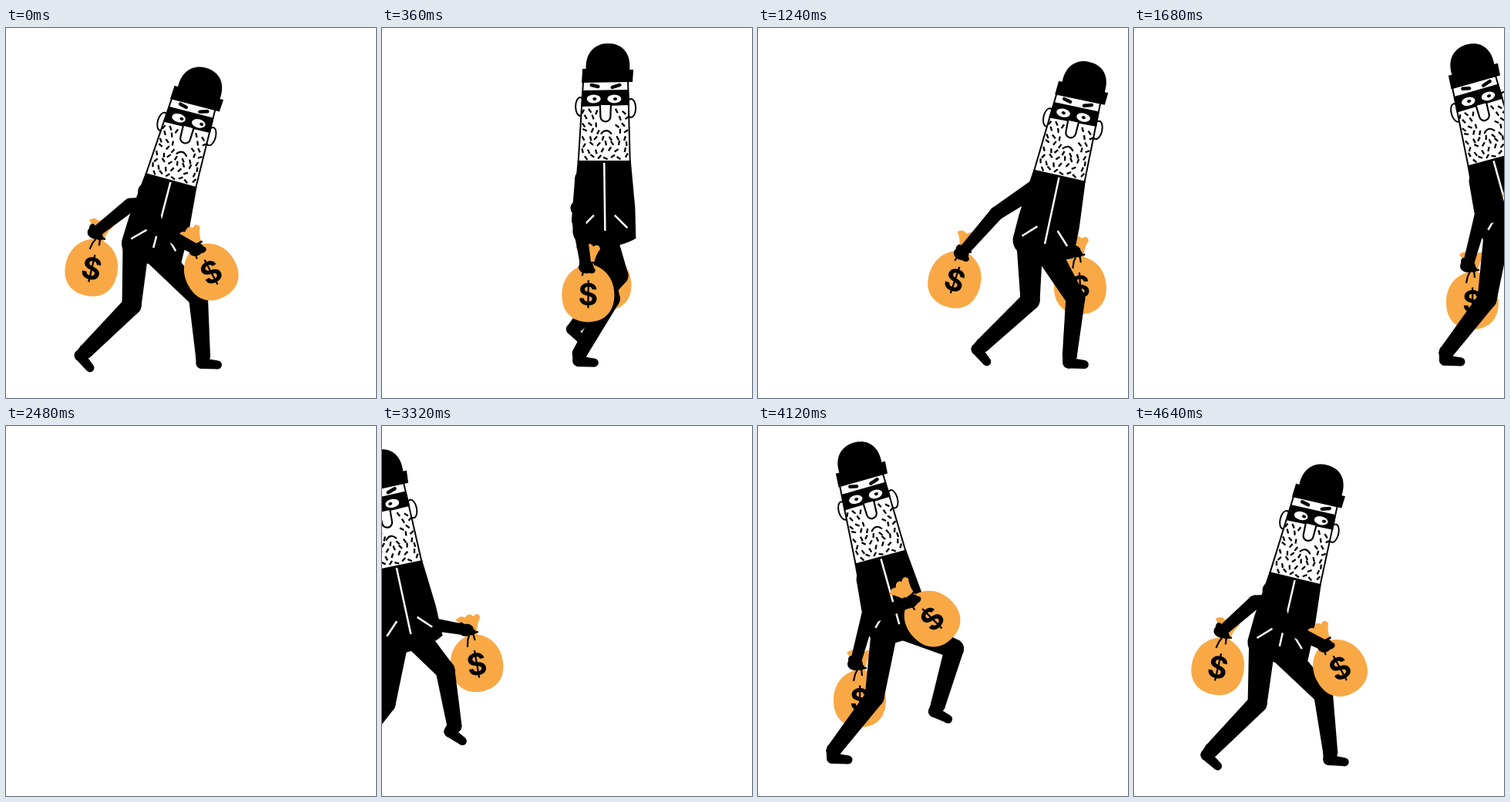
Write an HTML page with a canvas that moves like this. It is 480 by 480 pixels and loops after 4680 ms.

```html
<!DOCTYPE html>
<html lang="en">
<head>
<meta charset="utf-8">
<title>Sneaking burglar</title>
<style>
html, body { margin: 0; width: 100%; height: 100%; overflow: hidden; background: #fff; }
canvas { display: block; width: 480px; height: 480px; }
</style>
</head>
<body>
<canvas id="stage" width="480" height="480"></canvas>
<script>
const ctx = document.getElementById('stage').getContext('2d');
const LOOP = 4680, CYCLE = 2240, TICK = 40, STRIDE = 307;
const BLACK = '#000', WHITE = '#fff', GOLD = '#f9a846';

// Smooth keyed track that repeats every `period`, moving on by `stride` in its first column
// (and in every column listed in `moving`). Rows are [phase, ...values].
function track(rows, period, stride, moving = [0]) {
  const n = rows.length;
  const key = i => {
    const turn = Math.floor(i / n), row = rows[i - turn * n];
    return { p: row[0] + turn * period, v: row.slice(1).map((x, c) => moving.includes(c) ? x + turn * stride : x) };
  };
  const slope = (a, b, c) => (b.v[c] - a.v[c]) / (b.p - a.p);
  const tangent = (s, t) => s * t <= 0 ? 0 : 2 * s * t / (s + t);
  return phase => {
    let i = Math.floor(phase / period) * n;
    while (key(i + 1).p <= phase) i++;
    const [k0, k1, k2, k3] = [-1, 0, 1, 2].map(d => key(i + d));
    const h = k2.p - k1.p, u = (phase - k1.p) / h;
    return k1.v.map((a, c) => {
      const s = slope(k1, k2, c);
      const m1 = tangent(slope(k0, k1, c), s) * h, m2 = tangent(s, slope(k2, k3, c)) * h;
      const d = k2.v[c] - a;
      return a + u * (m1 + u * (3 * d - 2 * m1 - m2 + u * (m1 + m2 - 2 * d)));
    });
  };
}

// chin x, y, lean
const body = track([
  [0, 159, 170.5, -15], [.107, 157, 178, -15.5], [.143, 162, 182, -11.5],
  [.232, 209, 198, 13.6], [.25, 214, 198, 15.3], [.41, 288, 173, 0]
], .5, STRIDE / 2);

// knee x, y, ankle x, y, foot angle
const leg = track([
  [0, 151, 352, 98, 421, 0], [.107, 141, 360, 98, 424, 0], [.232, 160, 360, 101, 420, 38],
  [.25, 163, 360, 104, 419, 45], [.375, 262, 335, 200, 395, 45], [.5, 403, 289, 382, 362, 22],
  [.607, 381, 299, 386, 376, 25], [.643, 379, 317, 391, 389, 30], [.75, 398, 350, 404, 425, 0]
], 1, STRIDE, [0, 2]);

// bag centre x, y, tilt
const nearBag = track([
  [0, 226, 250, -45], [.16, 268, 304, -34], [.19, 272, 309, -30], [.25, 266, 317, -28],
  [.375, 268, 345, -5], [.5, 262, 346, 15], [.607, 222, 325, 42], [.67, 204, 316, 44],
  [.75, 213, 312, 30], [.87, 345, 348, 2]
], 1, STRIDE);
const farBag = track([
  [0, 132, 355, 0], [.13, 103, 335, 10], [.25, 111, 312, 13], [.375, 240, 345, 0],
  [.5, 397, 275, -25], [.607, 419, 290, -15], [.643, 420, 309, -10], [.75, 417, 325, -5], [.88, 421, 348, -2]
], 1, STRIDE);

// face shift, pupil shift
const look = track([[0, 0, 1], [.25, 0, 4], [.5, -3, -1], [.607, -4, -3], [.75, -2, 0]], 1, 0, []);
// hip position of one leg, sideways in the jacket
const hip = track([[0, -21], [.25, -21], [.5, 7], [.75, 7]], 1, 0, []);

const rad = deg => deg * Math.PI / 180;
const place = ([x, y, deg], lx, ly) => {
  const c = Math.cos(rad(deg)), s = Math.sin(rad(deg));
  return [x + lx * c - ly * s, y + lx * s + ly * c];
};
function inFrame([x, y, deg], draw) {
  ctx.save();
  ctx.translate(x, y);
  ctx.rotate(rad(deg));
  draw();
  ctx.restore();
}
function fill(color, build) {
  ctx.beginPath();
  build();
  ctx.closePath();
  ctx.fillStyle = color;
  ctx.fill();
}
const poly = (color, ...pts) => fill(color, () => pts.forEach(p => ctx.lineTo(...p)));
const oval = (color, x, y, rx, ry = rx) => fill(color, () => ctx.ellipse(x, y, rx, ry, 0, 0, 7));
function line(color, width, ...pts) {
  ctx.beginPath();
  pts.forEach(p => ctx.lineTo(...p));
  ctx.strokeStyle = color;
  ctx.lineWidth = width;
  ctx.stroke();
}
function taper(a, b, ra, rb) {
  const d = Math.hypot(b[0] - a[0], b[1] - a[1]) || 1;
  const nx = (a[1] - b[1]) / d, ny = (b[0] - a[0]) / d;
  oval(BLACK, ...a, ra);
  oval(BLACK, ...b, rb);
  poly(BLACK, [a[0] + nx * ra, a[1] + ny * ra], [b[0] + nx * rb, b[1] + ny * rb],
    [b[0] - nx * rb, b[1] - ny * rb], [a[0] - nx * ra, a[1] - ny * ra]);
}

function drawLeg(hipPoint, [kx, ky, ax, ay, turn], shift) {
  const knee = [kx + shift, ky], ankle = [ax + shift, ay], foot = [...ankle, turn];
  taper(hipPoint, knee, 17, 12.5);
  taper(knee, ankle, 12.5, 9.5);
  taper(place(foot, -2, 10), place(foot, 19, 12), 7, 5.5);
  taper(ankle, place(foot, -1, 9), 9.5, 8);
}

function drawArm(shoulder, hand, tilt) {
  const dx = hand[0] - shoulder[0], dy = hand[1] - shoulder[1], d = Math.hypot(dx, dy);
  const k = Math.max(1, d / 107), upper = 50 * k, lower = 58 * k;
  const along = (upper * upper - lower * lower + d * d) / (2 * d);
  const out = Math.sqrt(Math.max(0, upper * upper - along * along));
  const elbow = [shoulder[0] + (dx * along - dy * out) / d, shoulder[1] + (dy * along + dx * out) / d];
  taper(shoulder, elbow, 11, 9);
  taper(elbow, hand, 9, 7);
  inFrame([...hand, tilt], () => {
    oval(BLACK, 0, 0, 10, 8);
    oval(BLACK, -5, -6, 4, 5);
    oval(BLACK, 7, 4, 5, 4);
  });
}

function drawBag(pose) {
  inFrame(pose, () => {
    fill(GOLD, () => {
      ctx.moveTo(-7, -38);
      ctx.quadraticCurveTo(-9, -52, -17, -61);
      ctx.quadraticCurveTo(-10, -67, -5, -62);
      ctx.quadraticCurveTo(2, -69, 6, -62);
      ctx.quadraticCurveTo(13, -67, 15, -59);
      ctx.quadraticCurveTo(8, -50, 7, -38);
      ctx.bezierCurveTo(25, -32, 34, -17, 34, 1);
      ctx.bezierCurveTo(34, 24, 20, 36, 0, 36);
      ctx.bezierCurveTo(-20, 36, -34, 24, -34, 1);
      ctx.bezierCurveTo(-34, -17, -25, -32, -7, -38);
    });
    line(BLACK, 2.5, [-9, -41], [9, -41]);
    line(BLACK, 2.2, [-2, -41], [-6, -33], [-8, -24]);
    line(BLACK, 2.2, [2, -41], [3, -31]);
    ctx.fillStyle = BLACK;
    ctx.font = 'bold 39px Inter, Arial, sans-serif';
    ctx.textAlign = 'center';
    ctx.textBaseline = 'alphabetic';
    ctx.fillText('$', 0, 14);
  });
}

function drawJacket() {
  fill(BLACK, () => {
    ctx.moveTo(-34.5, -1);
    ctx.lineTo(34.5, -1);
    ctx.lineTo(40, 60);
    ctx.lineTo(41, 100);
    ctx.quadraticCurveTo(20, 112, -10, 112);
    ctx.quadraticCurveTo(-38, 112, -41, 92);
    ctx.lineTo(-40, 60);
  });
  line(WHITE, 2.5, [0, 2], [1, 90]);
  for (const side of [-1, 1]) line(WHITE, 2.5, [13.5 * side, 70], [30 * side, 86.5]);
}

const noise = n => { const v = Math.sin(n * 127.1 + 11.7) * 43758.5453; return v - Math.floor(v); };
function drawStubble() {
  for (let row = 0; row < 8; row++) for (let col = 0; col < 7; col++) {
    const id = row * 7 + col;
    const x = -27 + col * 9 + (row % 2 ? 2 : -1) + (noise(id) - .5) * 3;
    const y = -64 + row * 8.3 + (noise(id + 60) - .5) * 4;
    const byNose = Math.abs(x - 2) < 11 && y < -46;
    const byMouth = Math.abs(x - 3) < 10 && y > -45 && y < -32;
    if (byNose || byMouth || x > 30) continue;
    const a = (noise(id + 120) - .5) * 2.4 + Math.PI / 2, c = Math.cos(a) * 3, s = Math.sin(a) * 3;
    line(BLACK, 2.3, [x - c, y - s], [x + c, y + s]);
  }
}

function drawHead([shift, pupil]) {
  for (const [x, y] of [[-31, -71], [35, -69]]) {
    oval(BLACK, x, y, 7, 13);
    oval(WHITE, x, y, 5, 11);
  }
  const face = [[-27, -104], [31, -104], [33.5, 0], [-33.5, 0]];
  poly(WHITE, ...face);
  line(BLACK, 2, ...face, face[0]);
  drawStubble();
  poly(BLACK, [-28, -92], [32, -93], [33, -73], [-30, -71]);

  ctx.save();
  ctx.translate(shift, 0);
  for (const x of [-11.7, 15]) {
    oval(WHITE, x, -81, 9, 5.5);
    oval(BLACK, x + pupil, -81, 2.6, 2);
  }
  ctx.lineCap = 'round';
  line(BLACK, 4.5, [-14.5, -99], [-6, -97]);
  line(BLACK, 4.5, [12.5, -96], [22, -99]);
  ctx.beginPath();
  ctx.moveTo(-3.5, -73);
  ctx.lineTo(-3, -58);
  ctx.arc(3.5, -58, 6.5, Math.PI, 0, true);
  ctx.lineTo(10.5, -73);
  ctx.fillStyle = WHITE;
  ctx.fill();
  ctx.lineWidth = 2.2;
  ctx.stroke();
  ctx.beginPath();
  ctx.moveTo(-2, -36);
  ctx.quadraticCurveTo(4.5, -43.5, 11, -36);
  ctx.stroke();
  ctx.restore();

  fill(BLACK, () => {
    ctx.moveTo(-23, -116);
    ctx.bezierCurveTo(-26, -140, -12, -153, 5, -153);
    ctx.bezierCurveTo(24, -153, 36, -140, 33, -116);
  });
  poly(BLACK, [-28, -120], [38, -119], [37, -103], [-29, -102]);
}

function drawBurglar(phase) {
  const pose = body(phase), near = nearBag(phase), far = farBag(phase);
  drawBag(far);
  drawArm(place(pose, 5, 30), place(far, -6, -46), far[2]);
  drawLeg(place(pose, hip(phase)[0], 96), leg(phase), 0);
  drawLeg(place(pose, hip(phase - .5)[0], 96), leg(phase - .5), STRIDE / 2 + 5);
  inFrame(pose, () => {
    drawJacket();
    drawHead(look(phase));
  });
  drawBag(near);
  drawArm(place(pose, -27, 22), place(near, -3, -35), near[2]);
}

function render(now) {
  const t = Math.floor((now % LOOP) / TICK) * TICK;
  ctx.fillStyle = WHITE;
  ctx.fillRect(0, 0, 480, 480);
  ctx.save();
  if (t < 2480) {
    drawBurglar(.25 + t / CYCLE);
  } else if (t >= 2600) {
    // the entrance runs slightly ahead, then settles into step
    ctx.translate(10 * Math.min(1, Math.max(0, (4000 - t) / 680)), 0);
    drawBurglar(.25 + (t - LOOP) / CYCLE);
  }
  ctx.restore();
}

const start = performance.now();
function tick() {
  render(performance.now() - start);
  requestAnimationFrame(tick);
}
tick();
</script>
</body>
</html>
```
